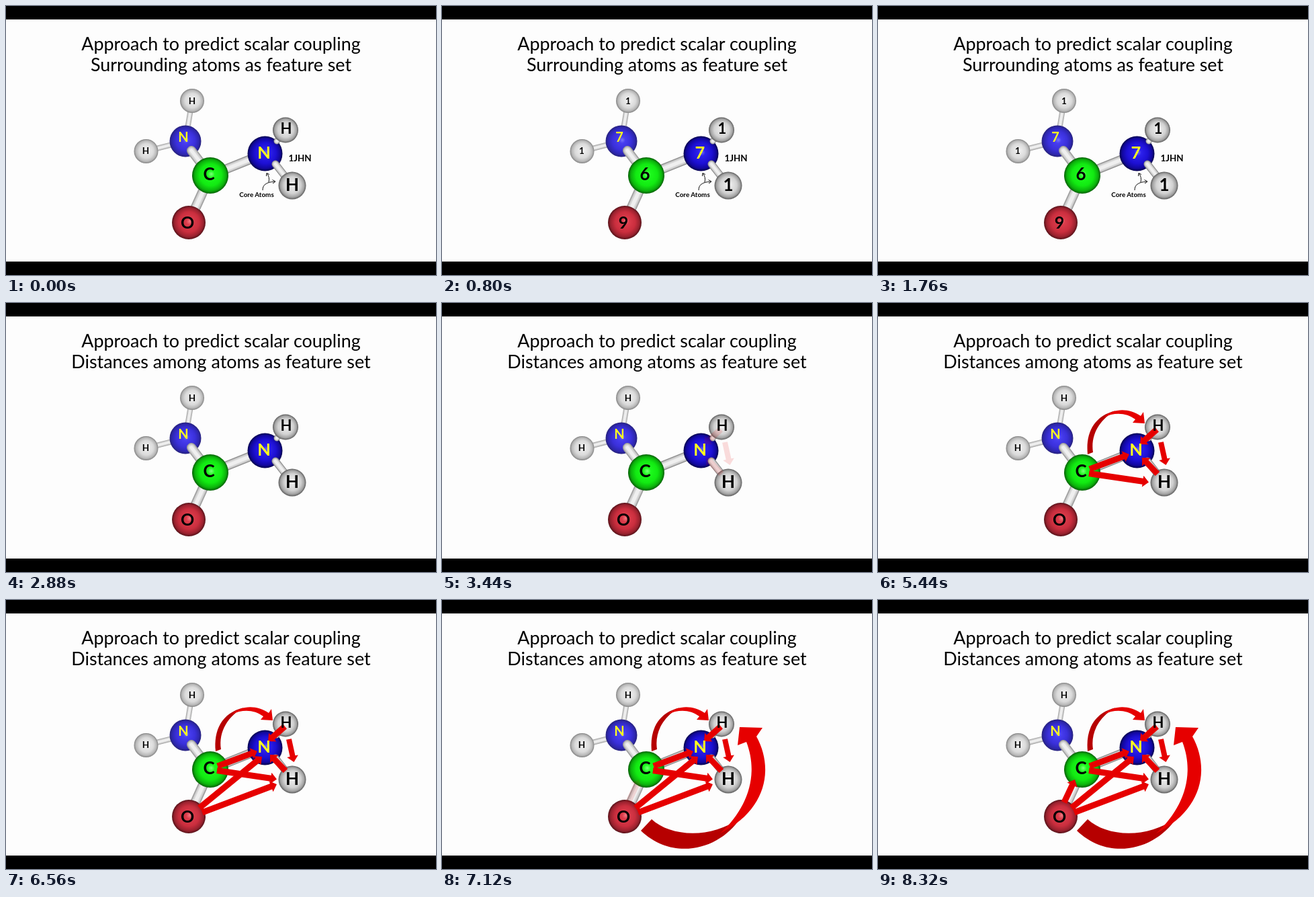
Recreate the animation shown at these times as an HTML page. Size 640 px wide and 400 px high, loop 8.4 s.

```html
<!DOCTYPE html>
<html lang="en">
<head>
<meta charset="utf-8">
<title>Scalar coupling features</title>
<style>
html, body { margin: 0; width: 100%; height: 100%; overflow: hidden; background: #000; }
svg { display: block; width: 100%; height: 100%; }
text { font-family: Lato, "Open Sans", sans-serif; text-anchor: middle; }
.title { font-size: 26.9px; }
.label, .note { font-weight: 700; }
</style>
</head>
<body>
<svg id="stage" viewBox="0 0 640 400"></svg>
<script>
const LOOP = 8400, STEP = 80, RED = '#e60000', DARK_RED = '#b60000';
const stage = document.getElementById('stage');

function add(parent, tag, attrs, text) {
  const el = document.createElementNS('http://www.w3.org/2000/svg', tag);
  for (const k in attrs) el.setAttribute(k, attrs[k]);
  if (text) el.textContent = text;
  parent.appendChild(el);
  return el;
}
const group = () => add(stage, 'g', {});

add(stage, 'rect', { width: 640, height: 400, fill: '#000' });
add(stage, 'rect', { y: 20, width: 640, height: 360, fill: '#fdfdfd' });

const defs = add(stage, 'defs', {});
function gradient(id, colors) {
  const g = add(defs, 'radialGradient', { id, cx: .5, cy: .5, r: .5, fx: .53, fy: .46 });
  colors.forEach((color, i) => add(g, 'stop', { offset: [0, .2, .6, .85, 1][i], 'stop-color': color }));
}
gradient('grey', ['#fff', '#e8e8e8', '#d2d2d2', '#a4a4a4', '#5c5c5c']);
gradient('pale', ['#fff', '#ececec', '#dadada', '#b8b8b8', '#848484']);
gradient('navy', ['#6a66ff', '#2c20ec', '#1d10d4', '#1208a0', '#07034c']);
gradient('blue', ['#7a76fa', '#473df0', '#3a30da', '#2e27b0', '#27227c']);
gradient('green', ['#7cff7c', '#1cfa1c', '#12ea12', '#0cb40c', '#066006']);
gradient('red', ['#f27a84', '#dc3c4b', '#ca2e3e', '#9c222f', '#561219']);

const atoms = {
  hLeft: { x: 208.5, y: 216, r: 18, fill: 'pale', letter: 'H', digit: '1', size: 13.5, tx: 208, ty: 219.5 },
  hTop: { x: 277, y: 141, r: 18, fill: 'pale', letter: 'H', digit: '1', size: 13.5, tx: 277, ty: 145.5 },
  nBack: { x: 267, y: 201, r: 23.5, fill: 'blue', letter: 'N', digit: '7', size: 20, tx: 264, ty: 202 },
  c: { x: 304, y: 252, r: 27, fill: 'green', letter: 'C', digit: '6', size: 26, tx: 302, ty: 259 },
  nFront: { x: 385.5, y: 219.5, r: 26, fill: 'navy', letter: 'N', digit: '7', size: 25.5, tx: 384, ty: 227 },
  o: { x: 272, y: 322, r: 25, fill: 'red', letter: 'O', digit: '9', size: 25, tx: 270, ty: 331 },
  hUp: { x: 416, y: 184.5, r: 19, fill: 'grey', letter: 'H', digit: '1', size: 22, tx: 417, ty: 189.5 },
  hDown: { x: 426, y: 267, r: 20.5, fill: 'grey', letter: 'H', digit: '1', size: 26, tx: 426, ty: 274.5 }
};

// Stacked strokes give the cylinders their shading.
function bond(x1, y1, x2, y2, w, dark) {
  [[1, dark], [.84, '#bcbcbc'], [.66, '#d8d8d8'], [.38, '#efefef']].forEach(([k, stroke]) =>
    add(stage, 'line', { x1, y1, x2, y2, stroke, 'stroke-width': w * k, 'stroke-linecap': 'round' }));
}
function ball(a) {
  add(stage, 'circle', { cx: a.x, cy: a.y, r: a.r, fill: `url(#${a.fill})` });
}
bond(267, 201, 277, 141, 8, '#a4a4a4');
bond(267, 201, 208, 216, 8, '#a4a4a4');
['hLeft', 'hTop', 'nBack'].forEach(k => ball(atoms[k]));
bond(276, 215, 304, 252, 14, '#999');
bond(304, 252, 272, 322, 15, '#999');
bond(304, 252, 386, 219, 14, '#888');
ball(atoms.o);
ball(atoms.c);
ball(atoms.nFront);
bond(403, 201, 416, 184, 9, '#888');
bond(401, 235, 426, 267, 11, '#888');
ball(atoms.hUp);
ball(atoms.hDown);

// Straight arrow with its tip at (x2, y2).
function arrow(parent, x1, y1, x2, y2, w = 9, head = 9, wide = 17) {
  const len = Math.hypot(x2 - x1, y2 - y1), turn = Math.atan2(y2 - y1, x2 - x1) * 180 / Math.PI;
  const b = len - head, h = w / 2, k = wide / 2;
  add(parent, 'path', {
    d: `M0 ${-h}H${b}V${-k}L${len} 0L${b} ${k}V${h}H0Z`,
    transform: `translate(${x1} ${y1}) rotate(${turn})`, fill: RED
  });
}
const shape = (parent, fill, d) => add(parent, 'path', { d, fill });

const core = group();
arrow(core, 415, 188, 390, 210);
arrow(core, 416, 254, 393, 230);
arrow(core, 421, 207, 428.5, 241, 8);

const cToN = group();
arrow(cToN, 315, 247, 374, 225);

const cToH = group();
arrow(cToH, 314, 253.5, 403, 266.5);
shape(cToH, DARK_RED, 'M312 225C309 195 320 168 354 160C331 172 316 195 320 222Z');
shape(cToH, RED, 'M336 170C350 156 374 156 391 168L395 162L397 179L379 178L383 173C370 163 352 162 336 170Z');

const oToN = group();
arrow(oToN, 288, 309, 381, 233);

const oToH = group();
arrow(oToH, 292, 316, 403, 274);

const sweep = group();
shape(sweep, DARK_RED, 'M296 343L312 326C340 352 400 356 444 324C415 370 345 390 296 343Z');
shape(sweep, RED, 'M414 347C455 310 472 260 453 211L440 216L443 189L477 190L468 203C494 250 484 312 414 347Z');

const oToC = group();
arrow(oToC, 277, 301, 293, 267);

const letters = group(), digits = group();
for (const { letter, digit, size, tx, ty } of Object.values(atoms)) {
  const style = { class: 'label', x: tx, y: ty, 'font-size': size, fill: letter === 'N' ? '#ffff1e' : '#000' };
  add(letters, 'text', style, letter);
  add(digits, 'text', style, digit);
}

const notes = group();
add(notes, 'text', { class: 'note', x: 437.5, y: 231, 'font-size': 13.4 }, '1JHN');
add(notes, 'text', { class: 'note', x: 373, y: 284, 'font-size': 9.9 }, 'Core Atoms');
add(notes, 'path', {
  d: 'M382 274C382 266 387 262 400 261M391 262Q393 254 388 249M396.5 258.5L401 261L397 264M387.5 253L388 248.5L392 250.5',
  fill: 'none', stroke: '#111', 'stroke-width': 1
});

const title = (parent, y, text) => add(parent, 'text', { class: 'title', x: 320, y }, text);
title(stage, 66, 'Approach to predict scalar coupling');
const around = group(), apart = group();
title(around, 97, 'Surrounding atoms as feature set');
title(apart, 97, 'Distances among atoms as feature set');

const fades = [
  [core, 3360, 3980], [cToN, 4320, 4640], [cToH, 4880, 5360], [oToN, 5680, 6000],
  [oToH, 6140, 6330], [sweep, 6560, 6960], [oToC, 7100, 7290]
];
const ramp = (t, a, b) => Math.min(1, Math.max(0, (t - a) / (b - a)));
const show = (el, v) => el.setAttribute('opacity', v);

function draw(now) {
  const t = Math.floor(now % LOOP / STEP) * STEP;
  const numbered = ramp(t, 40, 800), next = ramp(t, 1760, 2480);
  const digit = numbered * (1 - next);
  show(digits, digit);
  show(letters, 1 - digit);
  show(notes, 1 - next);
  show(around, 1 - next);
  show(apart, next);
  fades.forEach(([el, a, b]) => show(el, ramp(t, a, b)));
}

const start = performance.now();
function tick() {
  draw(performance.now() - start);
  requestAnimationFrame(tick);
}
tick();
</script>
</body>
</html>
```
